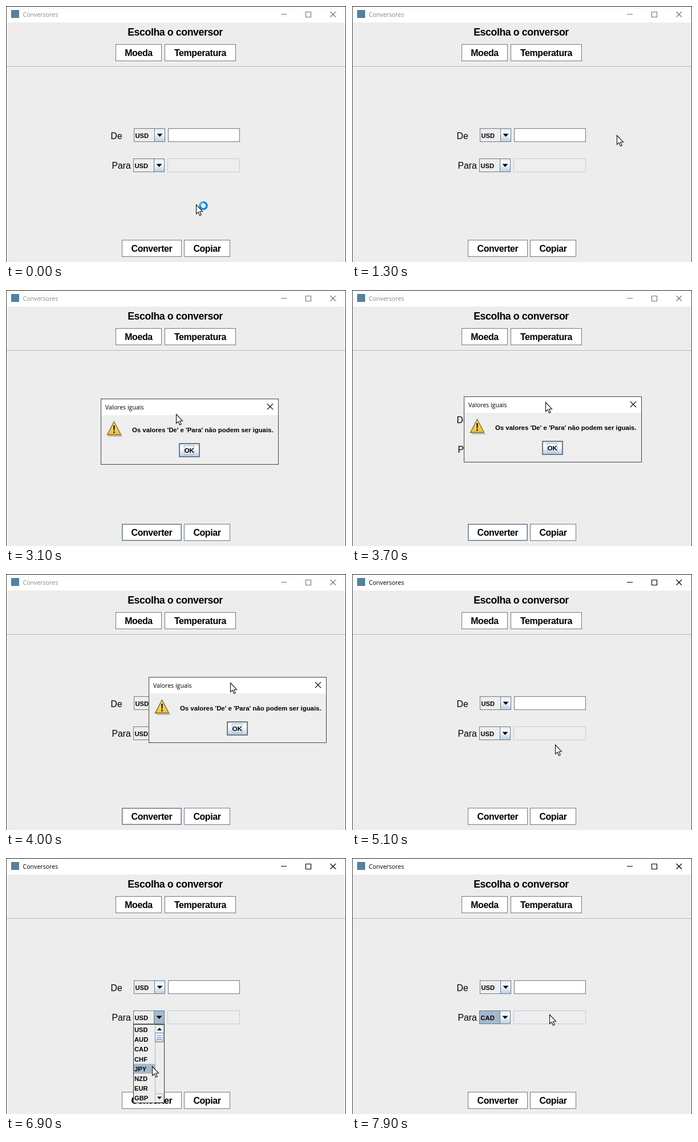
Write an HTML page that moves like this. It is 596 px wide and 450 px high and loops after 8000 ms.

```html
<!DOCTYPE html>
<html lang="pt">
<head>
<meta charset="utf-8">
<title>Conversores</title>
<style>
  html, body { margin: 0; width: 100%; height: 100%; overflow: hidden; background: #eee; }
  svg { display: block; }
  text { font-family: "Liberation Sans", Arial, sans-serif; white-space: pre; }
  .ui { font-family: "Open Sans", "Noto Sans", sans-serif; }
  .tight { letter-spacing: -.022em; }
</style>
</head>
<body>
<svg id="stage" width="596" height="450" viewBox="0 0 596 450"></svg>
<script>
const LOOP = 8000, STEP = 100;
const BORDER = '#6c7a89', BLUE = '#b8cfe5', SELECTED = '#a3b8cc', INK = '#000';
const CURRENCIES = ['USD', 'AUD', 'CAD', 'CHF', 'JPY', 'NZD', 'EUR', 'GBP'];
const ROW = 17.2, LIST_TOP = 293;
const stage = document.getElementById('stage');

// Keys are [time, x, y]
const POINTER = [
  [0, 333, 349], [300, 333, 349], [800, 440, 270], [1100, 490, 250], [1300, 464, 227],
  [1500, 340, 82], [1600, 235, 82], [1950, 274, 432], [2700, 274, 432],
  [3100, 298, 218], [3400, 309, 201], [3500, 309, 201], [4000, 393, 191],
  [4400, 343, 218], [4600, 343, 218], [5000, 356, 300], [5100, 356, 300],
  [5600, 270, 278], [6200, 270, 278], [6500, 252, 300], [6900, 256, 366],
  [7200, 250, 337], [7500, 250, 337], [7900, 346, 275]
];
const DRAG = [[3500, 166, 191], [4000, 250, 181], [4400, 200, 208]];

function along(keys, t) {
  if (t <= keys[0][0]) return keys[0].slice(1);
  const i = keys.findIndex(k => k[0] > t);
  if (i < 0) return keys[keys.length - 1].slice(1);
  const [t0, x0, y0] = keys[i - 1], [t1, x1, y1] = keys[i];
  const p = (t - t0) / (t1 - t0), e = p * p * (3 - 2 * p);
  return [Math.round(x0 + (x1 - x0) * e), Math.round(y0 + (y1 - y0) * e)];
}

const rect = (x, y, w, h, fill) =>
  `<rect x="${x}" y="${y}" width="${w}" height="${h}" fill="${fill}"/>`;
const box = (x, y, w, h, fill, stroke = BORDER, line = 1) =>
  `<rect x="${x + line / 2}" y="${y + line / 2}" width="${w - line}" height="${h - line}" fill="${fill}" stroke="${stroke}" stroke-width="${line}"/>`;
const path = (d, fill, stroke = 'none', line = 1) =>
  `<path d="${d}" fill="${fill}" stroke="${stroke}" stroke-width="${line}"/>`;
const text = (s, x, y, size, extra = '') =>
  `<text x="${x}" y="${y}" font-size="${size}" fill="${INK}" ${extra}>${s}</text>`;
const bold = (s, x, y, size, anchor = 'start', style = '') =>
  text(s, x, y, size, `font-weight="700" text-anchor="${anchor}" class="${style}"`);
const at = (x, y, body) => `<g transform="translate(${x} ${y})">${body}</g>`;
const inside = ([px, py], x, y, w, h) => px >= x && px < x + w && py >= y && py < y + h;

const BUTTONS = [
  ['Moeda', 192, 67, 81], ['Temperatura', 278, 67, 125],
  ['Converter', 203, 411, 105], ['Copiar', 312, 411, 81]
];

function button([label, x, y, w], over, pressed) {
  return box(x, y, w, 30, pressed ? BLUE : '#fff') +
    (over ? box(x + 1, y + 1, w - 2, 28, 'none', pressed ? BORDER : SELECTED) : '') +
    bold(label, x + w / 2, y + 21, 15.9, 'middle', 'tight');
}

function combo(x, y, value, focused, open) {
  return box(x, y, 55, 24, focused ? SELECTED : '#eee') +
    rect(x + 37, y + 1, 17, 22, open ? SELECTED : 'url(#steel)') +
    rect(x + 36, y + 1, 1, 22, BORDER) +
    path(`M${x + 40.5} ${y + 9.5}h10l-5 5.5z`, INK) +
    bold(value, x + 2.5, y + 16.5, 11.2);
}

function titleBar(active) {
  return rect(0, 0, 596, 29, '#fff') +
    rect(9, 7, 14, 14, '#5382a1') +
    `<text class="ui" x="29.5" y="19" font-size="10.6" fill="${active ? '#000' : '#888'}">Conversores</text>` +
    path('M482 14.5h10M525.5 10.5h9v9h-9zM568.5 10l9.5 9.5M578 10l-9.5 9.5', 'none', active ? '#000' : '#777', 1.2);
}

function popup(row) {
  const names = CURRENCIES.map((s, i) => bold(s, 225, LIST_TOP + 13 + ROW * i, 11.2)).join('');
  return box(223, 292, 55, 139, '#eee', '#333') +
    rect(224, LIST_TOP + ROW * row, 37, ROW, SELECTED) + names +
    box(261, 293, 16, 15, '#eee', SELECTED) + path('M265 303h8l-4-4.5z', INK) +
    box(261, 307, 15, 17, 'url(#steel)', '#6382bf') +
    path('M264 312.5h9M264 315.5h9M264 318.5h9', 'none', '#6382bf') +
    rect(261, 324, 1, 91, SELECTED) +
    box(261, 414, 16, 16, '#eee', SELECTED) + path('M265 419.5h8l-4 4.5z', INK);
}

function dialog(x, y) {
  return at(x, y,
    box(0, 0, 312, 116, '#eee', '#444') + rect(1, 1, 310, 28, '#fff') +
    text('Valores iguais', 8, 19, 10.6, 'class="ui"') +
    path('M292 9l10 10M302 9l-10 10', 'none', '#111', 1.2) +
    path('M14 65h23l2 1.5h-25z', '#aaa') +
    path('M23.5 40.5L35.5 63.5H11.5Z', 'url(#amber)', '#75611f', 1.3) +
    path('M22 47h3l-.6 9h-1.8z', '#222') + rect(22.2, 57.5, 2.6, 2.8, '#222') +
    bold("Os valores 'De' e 'Para' não podem ser iguais.", 55, 59, 11.4) +
    box(137, 78, 37, 25, 'url(#steel)', BORDER, 2) +
    box(146, 82, 18, 17, 'none', SELECTED) +
    bold('OK', 155.3, 95, 11.4, 'middle'));
}

function pointer([x, y], hand, busy) {
  const shape = hand
    ? path('M-2 1.5Q0 -1 2 1.5V6.5L9 8.5Q11 10 10.5 13L9 18H0L-5 11Q-5 8 -2 10Z', '#fff', '#111') +
      path('M2 6v5M5 7.5v4M8 8.5v3', 'none', '#111')
    : path('M.5 .5V16.5L4 13.2L6.6 19.2L9.2 18L6.6 12.2H11.5Z', '#fff', '#111', 1.1);
  const ring = busy === null ? '' :
    `<circle cx="13" cy="2" r="6" fill="#dff1fb" stroke="#1c84dc" stroke-width="3.5"/>` +
    `<path d="M7 2A6 6 0 0 1 13 -4" transform="rotate(${busy} 13 2)" fill="none" stroke="#45bdf0" stroke-width="3.5"/>`;
  return at(x, y, shape + ring);
}

const DEFS = `<defs>
  <linearGradient id="steel" x2="0" y2="1"><stop stop-color="#dde8f3"/><stop offset=".35" stop-color="#fff"/><stop offset="1" stop-color="#b8cfe5"/></linearGradient>
  <linearGradient id="amber" x2="0" y2="1"><stop stop-color="#ffe790"/><stop offset="1" stop-color="#f0bd35"/></linearGradient>
</defs>`;

function scene(t) {
  const pos = along(POINTER, t);
  const modal = t >= 2800 && t < 5100;
  const open = t >= 5700 && t < 7500;
  const chosen = t >= 7500;
  const active = t >= 2100 && !modal;
  const row = inside(pos, 223, LIST_TOP, 38, ROW * 8) ? Math.floor((pos[1] - LIST_TOP) / ROW) : 0;
  let hand = false, out = DEFS + rect(0, 0, 596, 450, '#ededed') + titleBar(active);

  out += rect(0, 106, 596, 1, '#aaa') + rect(0, 107, 596, 1, '#fff') +
    bold('Escolha o conversor', 296.5, 52, 17.7, 'middle', 'tight');
  for (const b of BUTTONS) {
    const over = !modal && !open && inside(pos, b[1], b[2], b[3], 30);
    const main = b[0] === 'Converter';
    hand = hand || over;
    out += button(b, over || main && modal, main && t >= 2100 && t < 2800);
  }
  out += text('De', 183.5, 234, 15.8) + text('Para', 185.5, 286, 15.8) +
    combo(224, 215, 'USD', false, false) + box(284, 215, 126, 24, '#fff') +
    combo(223, 268, chosen ? 'CAD' : 'USD', chosen, open) + box(283, 268, 127, 24, '#eee', BLUE);
  if (open) out += popup(row);
  if (modal) out += dialog(...along(DRAG, t));
  out += rect(0, 0, 596, 1, '#222') + rect(0, 0, 1, 450, '#444') + rect(595, 0, 1, 450, '#444');
  return out + pointer(pos, hand, t < 400 ? t * .4 : null);
}

let last = -1;
function tick() {
  const t = Math.floor(performance.now() % LOOP / STEP) * STEP;
  if (t !== last) stage.innerHTML = scene(last = t);
  requestAnimationFrame(tick);
}
tick();
</script>
</body>
</html>
```
